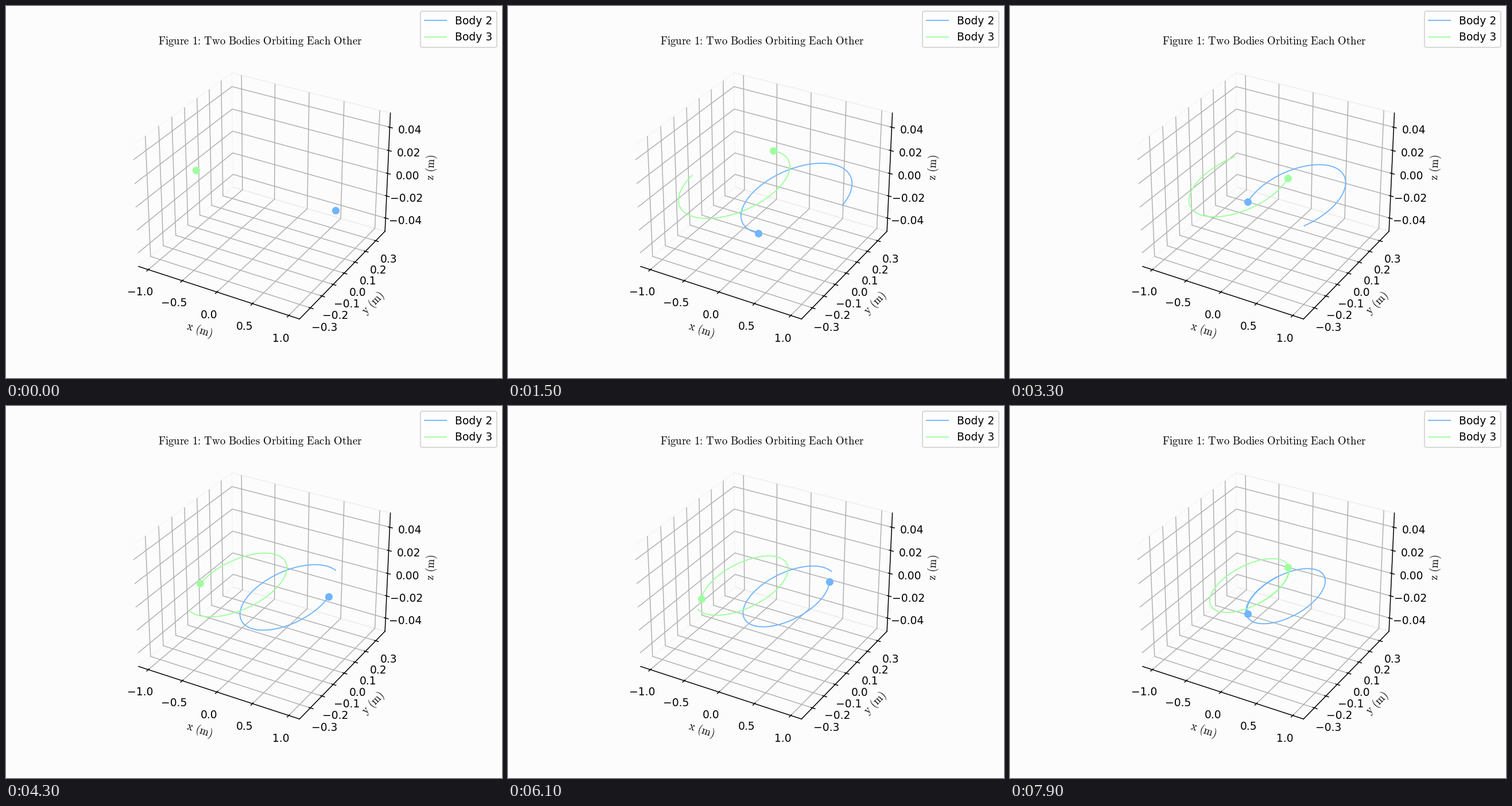
Animation of 864 by 648 pixels, one loop 8 s. Source, as a matplotlib script:

```python
import numpy as np
import matplotlib.pyplot as plt
from matplotlib.animation import FuncAnimation

FRAMES, INTERVAL = 80, 100
TRAIL = 1.4            # seconds of path kept behind each body
BACKGROUND = "#fcfcfc"
BODIES = (("Body 2", "#70b5ff", 1), ("Body 3", "#9fff9f", -1))

plt.rcParams["mathtext.fontset"] = "cm"


def roman(text):
    """Set text in upright Computer Modern through mathtext."""
    text = text.replace(":", r"\hspace{-0.2}:\hspace{-0.2}")
    return r"$\mathrm{" + text.replace(" ", r"\hspace{0.38}") + "}$"


def ellipse(theta):
    """Semi-axes and focus offset; the orbit shrinks mostly near periapsis."""
    turns = (theta - 4 / 3 * np.sin(theta) + np.sin(2 * theta) / 6) / (2 * np.pi)
    far = 0.89 ** turns
    near = 0.117 * 0.975 ** turns
    return (far + near) / 2, np.sqrt(far * near), (far - near) / 2


# Kepler's equation, integrated over the eccentric anomaly from apoapsis
THETA = np.linspace(0, 32, 16001)
a, _, c = ellipse(THETA)
rate = 5.797 / (2 * np.pi) * np.sqrt(a) * (a + c * np.cos(THETA))
steps = (rate[1:] + rate[:-1]) / 2 * np.diff(THETA)
TIME = np.concatenate(([0], np.cumsum(steps)))


def position(t):
    theta = np.interp(t, TIME, THETA)
    a, b, c = ellipse(theta)
    return c + a * np.cos(theta), b * np.sin(theta)


fig = plt.figure(figsize=(6.4, 4.8), dpi=135, facecolor=BACKGROUND)
ax = fig.add_subplot(projection="3d", facecolor=BACKGROUND)

trails = [ax.plot([], [], [], color=color, lw=1, label=name)[0]
          for name, color, _ in BODIES]
dots = [ax.plot([], [], [], "o", color=color)[0] for _, color, _ in BODIES]

margin = 25 / 24
for name, limit in (("x", 1.1), ("y", 0.3762), ("z", 0.05)):
    ax.set(**{name + "lim": (-limit * margin, limit * margin),
              name + "label": roman(name + " (m)")})
for axis in (ax.xaxis, ax.yaxis, ax.zaxis):
    axis.pane.set_fill(False)
ax.set_title(roman("Figure 1: Two Bodies Orbiting Each Other"), fontsize=10)
fig.legend()


def update(i):
    t = i * INTERVAL / 1000
    x, y = position(np.linspace(max(0, t - TRAIL), t, 400))
    z = np.zeros_like(x)
    for trail, dot, (_, _, side) in zip(trails, dots, BODIES):
        trail.set_data_3d(side * x, side * y, z)
        dot.set_data_3d(side * x[-1:], side * y[-1:], z[-1:])
    return trails + dots


anim = FuncAnimation(fig, update, frames=FRAMES, interval=INTERVAL,
                     repeat=True, repeat_delay=0, blit=False)
plt.show()
```
